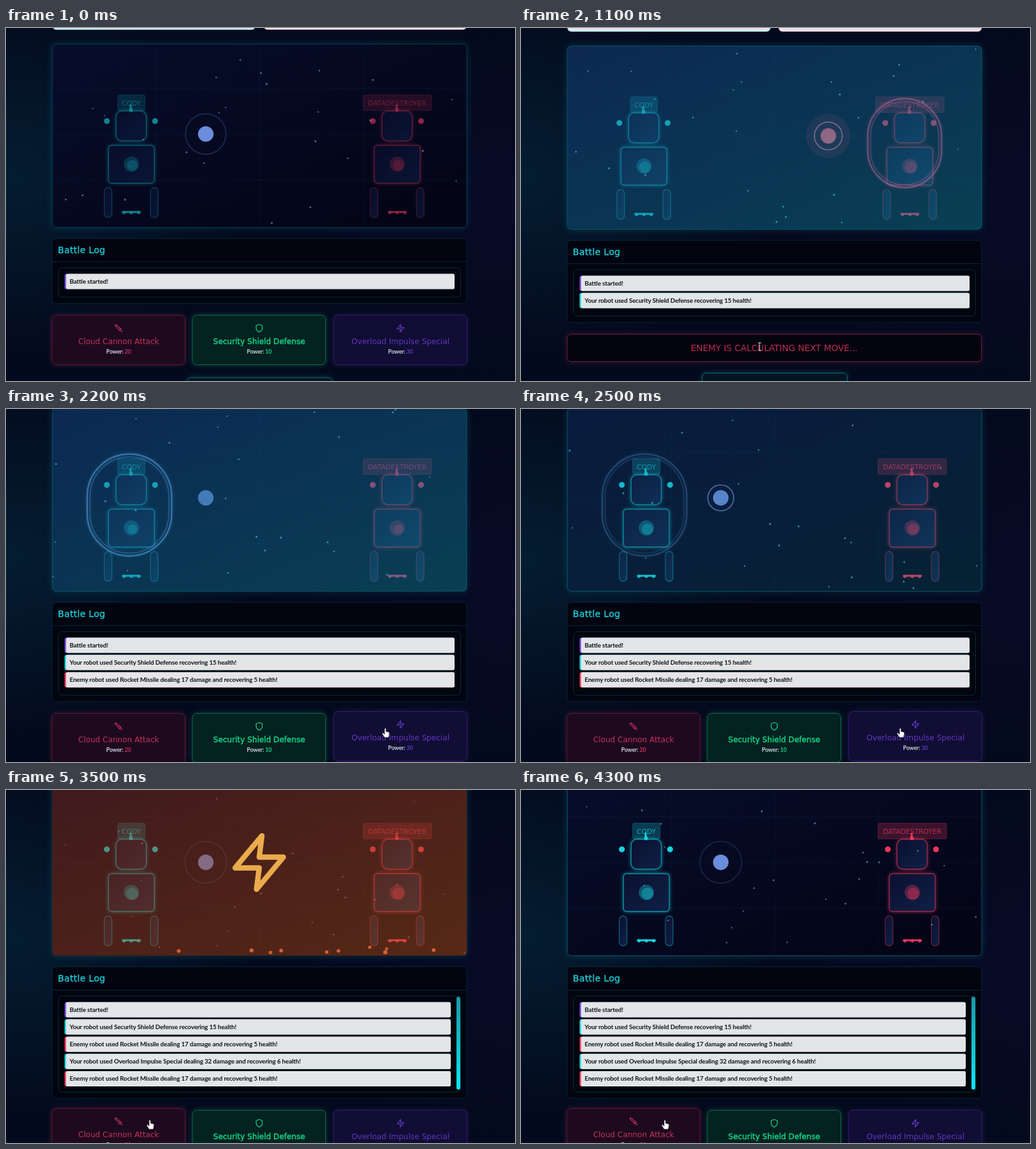
Write an HTML page that moves like this. It is 800 px wide and 555 px high and loops after 4.4 s.

```html
<!DOCTYPE html>
<html lang="en">
<head>
<meta charset="utf-8">
<title>Robot battle</title>
<style>
html, body { margin: 0; width: 100%; height: 100%; overflow: hidden; background: #040a1c; }
svg { display: block; width: 100vw; height: 100vh; }
text { font-family: "DejaVu Sans", sans-serif; }
.log { font: 700 9.9px Lato, sans-serif; letter-spacing: -.15px; fill: #11141d; }
.power { font: 700 8.8px Lato, sans-serif; letter-spacing: -.1px; fill: #d0d4de; }
.mid { text-anchor: middle; }
</style>
</head>
<body>
<svg viewBox="0 0 800 555" preserveAspectRatio="none">
  <defs>
    <radialGradient id="left" cx="0" cy=".42" r=".5">
      <stop stop-color="#053046" stop-opacity=".5"/><stop offset="1" stop-color="#053046" stop-opacity="0"/>
    </radialGradient>
    <radialGradient id="right" cx="1" cy=".5" r=".5">
      <stop stop-color="#0a0b2e" stop-opacity=".55"/><stop offset="1" stop-color="#0a0b2e" stop-opacity="0"/>
    </radialGradient>
    <linearGradient id="arena" x2="1" y2="1"><stop stop-color="#070d2b"/><stop offset="1" stop-color="#030414"/></linearGradient>
    <linearGradient id="blue" x2="1" y2="1"><stop stop-color="#114a80"/><stop offset="1" stop-color="#1088a2"/></linearGradient>
    <linearGradient id="red" x2="1" y2="1"><stop stop-color="#8c280c"/><stop offset="1" stop-color="#c45a18"/></linearGradient>
    <linearGradient id="metal" x2="1" y2="1"><stop stop-color="#0a1030"/><stop offset="1" stop-color="#0f2046"/></linearGradient>
    <linearGradient id="bar" x2="0" y2="1"><stop stop-color="#1a98a6"/><stop offset="1" stop-color="#0ee6f2"/></linearGradient>
    <clipPath id="inside"><rect id="insideRect" x="73" width="651" height="288" rx="6"/></clipPath>
  </defs>
  <rect width="800" height="555" fill="#040a1d"/>
  <rect width="800" height="555" fill="url(#left)"/>
  <rect width="800" height="555" fill="url(#right)"/>
  <g id="scene"></g>
</svg>
<script>
const LOOP = 4400, STEP = 100;
const CYAN = '#14d3dc', PINK = '#e8365c', GREEN = '#14d68a', VIOLET = '#6a3fd6';
const scene = document.getElementById('scene');
const insideRect = document.getElementById('insideRect');

// One entry per turn: start, arena top, whose move, log size, pulse phase and rate
const turns = [
  { at: 0, top: 23, n: 1, p0: .9, rate: 1.25 },
  { at: 1000, top: 26, enemy: true, n: 2, p0: .37, rate: .786 },
  { at: 1900, top: -4, n: 3, p0: .63, rate: 1.25 },
  { at: 2700, top: -1, enemy: true, n: 4, p0: .34, rate: 1.25 },
  { at: 3200, top: -30, n: 5, p0: .57, rate: 1.25 }
];
const log = [
  ['Battle started!', VIOLET],
  ['Your robot used Security Shield Defense recovering 15 health!', CYAN],
  ['Enemy robot used Rocket Missile dealing 17 damage and recovering 5 health!', PINK],
  ['Your robot used Overload Impulse Special dealing 32 damage and recovering 6 health!', CYAN],
  ['Enemy robot used Rocket Missile dealing 17 damage and recovering 5 health!', PINK]
];
const SWORD = 'M14.5 17.5 3 6V3h3l11.5 11.5M13 19l6-6M16 16l4 4M19 21l2-2';
const SHIELD = 'M12 22s8-4 8-10V5l-8-3-8 3v7c0 6 8 10 8 10z';
const BOLT = 'M13 2 3 14h9l-1 8 10-12h-9l1-8z';
const actions = [
  { x: 72, name: 'Cloud Cannon Attack', power: 20, color: '#c8305a', fill: '#1e0a1f', icon: SWORD },
  { x: 293, name: 'Security Shield Defense', power: 10, color: GREEN, fill: '#04221f', icon: SHIELD, bold: true },
  { x: 515, name: 'Overload Impulse Special', power: 30, color: '#6038c0', fill: '#110d34', icon: BOLT }
];
const pointer = [
  [600, 430, 575], [850, 392, 500], [1100, 375, 501], [1300, 375, 501], [1750, 620, 489], [1950, 620, 489],
  [2150, 597, 510], [2700, 597, 510], [2950, 231, 524], [3200, 231, 524], [3400, 227, 527]
];

function random(seed) {
  return () => {
    seed = (seed * 16807) % 2147483647;
    return seed / 2147483647;
  };
}
const rnd = random(4127);
const stars = Array.from({ length: 25 }, () => ({
  x: rnd() * 651, y: rnd() * 288, vx: rnd() * 60 - 30, vy: -20 - rnd() * 60, r: 1 + rnd() * .6
}));
const embers = Array.from({ length: 10 }, () => ({ x: rnd() * 560 + 125, up: rnd() * 10, r: 2.3 + rnd() }));

const clamp = v => Math.max(0, Math.min(1, v));
const smooth = v => (v = clamp(v), v * v * (3 - 2 * v));
const wrap = (v, m) => ((v % m) + m) % m;
const pulse = (t, from, to) => clamp((t - from) / 80) * clamp((to - t) / 200);
const fadeIn = t => .6 + .4 * clamp(t / 300);

const rect = (x, y, w, h, r, attrs) => `<rect x="${x}" y="${y}" width="${w}" height="${h}" rx="${r}" ${attrs}/>`;
const circle = (x, y, r, attrs) => `<circle cx="${x}" cy="${y}" r="${r}" ${attrs}/>`;
const label = (x, y, size, color, str, attrs = '') =>
  `<text x="${x}" y="${y}" font-size="${size}" fill="${color}" ${attrs}>${str}</text>`;
const heavy = color => `stroke="${color}" stroke-width=".4"`;
const glow = (color, size = 4) => `style="filter:drop-shadow(0 0 ${size}px ${color})"`;
const icon = (path, x, y, scale, color) =>
  `<path d="${path}" transform="translate(${x} ${y}) scale(${scale}) translate(-12 -12)" fill="none" stroke="${color}" stroke-width="2" stroke-linecap="round" stroke-linejoin="round"/>`;

function robot(cx, top, color, name, tagWidth, t) {
  const line = `fill="url(#metal)" stroke="${color}" stroke-width="1.4" stroke-opacity=".62"`;
  const solid = `fill="${color}"`;
  const beat = Math.sin(t / 130);
  let s = rect(cx - tagWidth / 2, top + 82, tagWidth, 25, 3, `fill="${color}" fill-opacity=".24" stroke="${color}" stroke-opacity=".25"`);
  s += label(cx, top + 99, 10.7, color, name, 'class="mid" opacity=".75"');
  s += `<g ${glow(color + '88', 3)}>`;
  s += rect(cx - 24, top + 107.5, 47.5, 47, 9, line);
  s += rect(cx - 36, top + 161.5, 72, 59.5, 5, line);
  s += '</g>';
  for (const x of [-42.5, 30])
    s += rect(cx + x, top + 228, 12, 47, 6, `fill="url(#metal)" stroke="${color}" stroke-width="1.3" stroke-opacity=".42"`);
  s += rect(cx - 2.5, top + 97, 3, 10, 1, solid) + circle(cx - .5, top + 106, 3, solid);
  s += circle(cx - 38.5, top + 123.3, 4.6, solid) + circle(cx + 37.3, top + 123.3, 4.6, solid);
  s += circle(cx, top + 191, 12, `${solid} fill-opacity=".32"`);
  s += circle(cx + 1.6, top + 193, 8.5 + beat, `${solid} fill-opacity=".36"`);
  s += rect(cx - 15, top + 264.7, 30, 3, 1.5, solid);
  for (const x of [-11.5, 0, 11.5]) s += circle(cx + x, top + 267, 2.6, solid);
  return s;
}

function turnOrb(turn, t) {
  const y = turn.top + 143.7, x = turn.enemy ? 483 : 314;
  const p = wrap(turn.p0 + (t - turn.at) / 1000 * turn.rate + .0001, 1);
  const r = 12 + 22 * p, fade = 1 - p;
  const [ball, ring] = turn.enemy ? ['#f5627a', '#ff8f98'] : ['#6c8ddb', '#6d86c8'];
  let s = '';
  if (p > .05 && p < .98) {
    if (turn.enemy) s += circle(x, y, r + 13, `fill="${PINK}" fill-opacity="${fade * .3}"`);
    s += circle(x, y, r, `fill="none" stroke="${ring}" stroke-width="1.8" stroke-opacity="${.16 + fade}"`);
  }
  return s + circle(x, y, 12.2, `fill="${ball}"`);
}

function shield(cx, cy, scale, color, alpha) {
  const w = 120 * scale, h = 144 * scale;
  const box = (d, sw, o) =>
    rect(cx - w / 2 + d, cy - h / 2 + d, w - 2 * d, h - 2 * d, w / 2 - d, `fill="none" stroke="${color}" stroke-width="${sw}" stroke-opacity="${o}"`);
  return `<g opacity="${alpha}" ${glow(color + '66', 3)}>${box(2, 2.6, .75)}${box(6.5, 1.6, .5)}</g>`;
}

function arena(turn, t) {
  const top = turn.top;
  const move = smooth((t - turn.at) / 300);
  const shift = -15 * (turn.enemy ? move : turn.at ? 1 - move : 0);
  const blueB = pulse(t, 1000, 1700), blueC = pulse(t, 1900, 2600), hot = pulse(t, 2700, 4050);
  const cool = blueB + blueC;
  const edge = hot > .5 ? '#7c3a2c' : CYAN;

  let s = rect(73, top + 2.5, 651, 288, 6, `fill="url(#arena)" stroke="${edge}" stroke-opacity="${.32 * fadeIn(t)}" ${glow('#0a7f9255', 6)}`);
  s += '<g clip-path="url(#inside)">';
  for (let i = 1; i < 4; i++)
    s += `<path d="M73 ${top + 72 * i}h651M${73 + 163 * i} ${top}v290" stroke="#1aa6b8" stroke-opacity=".07"/>`;
  s += `<g opacity="${fadeIn(t)}">${robot(197 + shift, top, CYAN, 'CODY', 43, t)}${robot(615 + shift, top, PINK, 'DATADESTROYER', 108, t)}</g>`;
  s += turnOrb(turn, t);
  if (cool) s += rect(73, top, 651, 290, 0, `fill="url(#blue)" opacity="${cool * .45}"`);
  if (hot) s += rect(73, top, 651, 290, 0, `fill="url(#red)" opacity="${hot * .43}"`);
  const dot = cool ? '#4cc3dc' : hot ? '#94607a' : '#7f9bbd';
  for (const p of stars) {
    const x = 73 + wrap(p.x + p.vx * t / 1000, 651), y = top + wrap(p.y + p.vy * t / 1000, 288);
    s += circle(x, y, p.r, `fill="${dot}" opacity=".65"`);
  }
  if (blueB) s += shield(603, top + 155, 1 + .1 * clamp((t - 1100) / 600), '#b0648e', blueB * .75);
  if (blueC) s += shield(194, top + 155, .95 + .19 * smooth((t - 1900) / 300), '#4a93cf', blueC * .85);
  if (hot) {
    for (const e of embers) {
      const x = 125 + wrap(e.x + turn.n * 137, 575);
      s += circle(x, top + 286 - e.up * ((t / 900) % 1), e.r, `fill="#e86c3c" opacity="${hot * .85}"`);
    }
    s += `<g opacity="${hot}">${icon(BOLT, 398, top + 144, 3.93 - .28 * Math.cos(t * Math.PI / 500), '#eaab4c')}</g>`;
  }
  return s + '</g>';
}

function battleLog(turn) {
  const top = turn.top, h = Math.min(19 + 27 * turn.n, 151), full = turn.n === 5;
  let s = rect(72.5, top + 308, 651.5, h + 56, 6, 'fill="#02040f" stroke="#0c8a9c" stroke-opacity=".22"');
  s += `<path d="M73 ${top + 344.5}h651" stroke="#0c8a9c" stroke-opacity=".26"/>`;
  s += label(81.5, top + 330.5, 14.2, '#1cc9d4', 'Battle Log', `letter-spacing=".25" ${heavy('#1cc9d4')}`);
  s += rect(82.5, top + 354, 632, h, 6, 'fill="#02040e" stroke="#0c8a9c" stroke-opacity=".3"');
  log.slice(0, turn.n).forEach(([str, color], i) => {
    const y = top + 363.5 + 27.1 * i, w = full ? 607 : 613;
    s += rect(92, y, w, 24, 3, `fill="${color}"`);
    s += rect(94.3, y, w - 2.3, 24, 2.5, 'fill="#e3e5e6"');
    s += `<text class="log" x="100" y="${y + 15.4}">${str}</text>`;
  });
  if (full) s += rect(708, top + 355, 6, 146, 3, 'fill="url(#bar)"');
  return s;
}

function actionButton(a, y, hover) {
  const cx = a.x + 105;
  y -= hover ? 3 : 0;
  return rect(a.x, y, 209.5, 78, 7, `fill="${a.fill}" stroke="${a.color}" stroke-opacity=".4" ${glow(a.color + '40', 4)}`) +
    icon(a.icon, cx, y + 20.5, .6, a.color) +
    label(cx, y + 45.8, 12.1, a.color, a.name, `class="mid" ${a.bold ? heavy(a.color) : ''}`) +
    `<text class="power mid" x="${cx}" y="${y + 60.5}">Power: <tspan fill="${a.color}">${a.power}</tspan></text>`;
}

function controls(turn, t) {
  const y = turn.top + Math.min(19 + 27 * turn.n, 151) + 382.5;
  const hovered = t < 1000 ? (t >= 800 ? 1 : -1) : turn.n === 3 ? (t > 2050 ? 2 : -1) : 0;
  let s = '';
  if (turn.enemy) {
    const dim = turn.n === 4 ? .55 : .82;
    s += rect(72.5, y, 651, 43, 6, `fill="#04040f" stroke="${PINK}" stroke-opacity=".42" ${glow(PINK + '40', 4)}`);
    s += label(398, y + 26.5, 13.65, PINK, 'ENEMY IS CALCULATING NEXT MOVE...', `class="mid" opacity="${dim}"`);
  } else {
    actions.forEach((a, i) => s += actionButton(a, y, i === hovered));
  }
  const by = y + (turn.enemy ? 43 : 78) + 18 + 3 - 3 * Math.cos((t - 1100) / 1400 * 2 * Math.PI);
  s += rect(284.5, by, 228, 44, 6, `fill="#041522" stroke="${CYAN}" stroke-opacity=".45" ${glow('#0a7f9266', 4)}`);
  s += label(398.5, by + 22, 14.5, CYAN, '▲ NEXT ARENA ROUND ▲', 'class="mid"');
  return s;
}

function cards(top) {
  if (top < 20) return '';
  return [[73, '#3fb4be'], [405, '#c06090']].map(([x, c]) =>
    rect(x, -20, 319, top, 6, `fill="${c}"`) + rect(x, -20, 319, top - .7, 6, 'fill="#e2e6e8"')).join('');
}

function cursor(turn, t) {
  if (t < pointer[0][0]) return '';
  let i = pointer.findIndex(k => k[0] > t);
  if (i < 0) i = pointer.length;
  const a = pointer[i - 1], b = pointer[i] || a;
  const f = smooth((t - a[0]) / (b[0] - a[0] || 1));
  const x = a[1] + (b[1] - a[1]) * f, y = a[2] + (b[2] - a[2]) * f;
  const beam = turn.n === 2 && x < 530;
  const shape = beam ? '<path d="M-2.5-6h5M-2.5 6h5M0-6v12" stroke="#dfe3ea" fill="none"/>'
    : turn.enemy || t < 800 ? '<path d="M-3-6v10l2.3-2 1.7 4 1.6-.7-1.7-3.8h3.2z" fill="#fff"/>'
    : '<path d="M-2-7c0-1.3 2.2-1.3 2.2 0v4l4 1c1 .3 1.5 1 1.3 2l-.8 5c-.1.7-.4 1.2-1 1.2h-5c-.6 0-1-.3-1.3-.8l-3-4.6c-.6-1 .6-2 1.5-1.2l2.1 1.8z" fill="#fff" stroke="#222" stroke-width=".5"/>';
  return `<g transform="translate(${x} ${y})">${shape}</g>`;
}

function draw(t) {
  const turn = turns.filter(k => k.at <= t).pop();
  insideRect.setAttribute('y', turn.top + 2.5);
  scene.innerHTML = cards(turn.top) + arena(turn, t) + battleLog(turn) + controls(turn, t) + cursor(turn, t);
}

let shown = -1;
function frame() {
  const t = Math.floor(performance.now() % LOOP / STEP) * STEP;
  if (t !== shown) draw(shown = t);
  requestAnimationFrame(frame);
}
frame();
</script>
</body>
</html>
```
